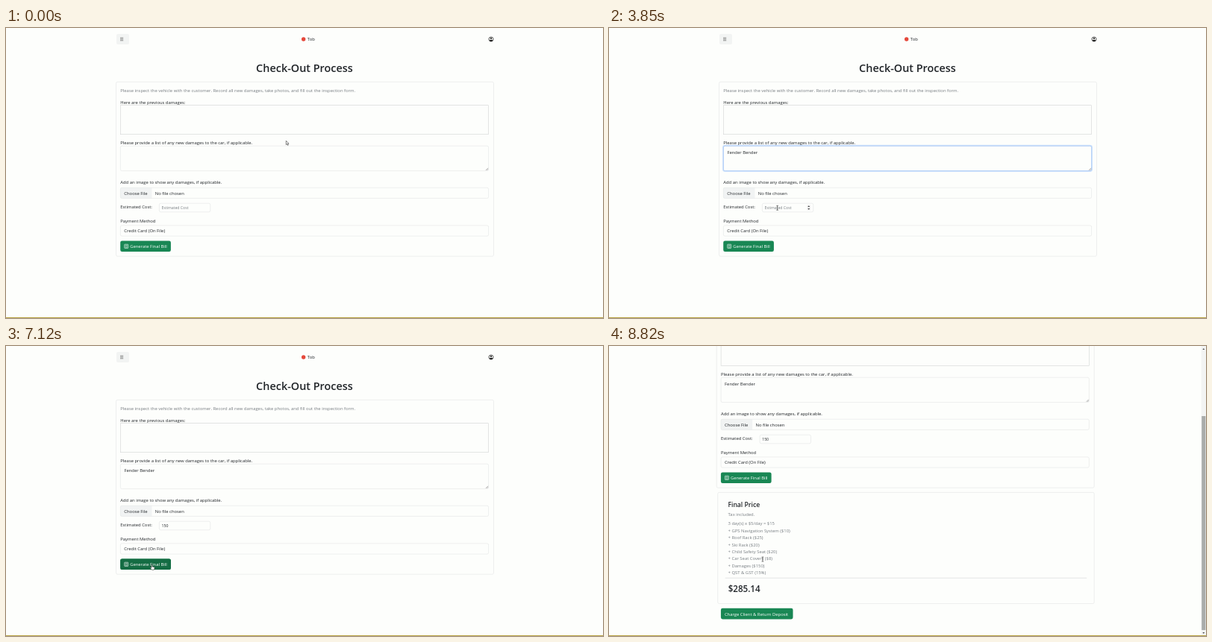
An HTML page that plays this animation: 800 by 389 pixels, repeating every 8850 ms.

```html
<!DOCTYPE html>
<html lang="en">
<head>
<meta charset="utf-8">
<title>Check-Out Process</title>
<style>
  html, body { margin: 0; height: 100%; overflow: hidden; background: #fdfefc; }
  svg { display: block; width: 100%; height: 100%; }
  text { font: 5.89px "Open Sans", "Noto Sans", sans-serif; fill: #212529; white-space: pre; }
  .title { font-size: 14.45px; font-weight: 600; text-anchor: middle; }
  .heading { font-size: 8.65px; font-weight: 600; }
  .total { font-size: 11.6px; font-weight: 600; }
  .muted text, text.muted { fill: #777d82; }
  .small { font-size: 5.17px; }
  .label { fill: #fff; }
  .box { fill: none; stroke: #e3e5e4; stroke-width: .6; }
  .strong { stroke: #d2d5d5; }
  .ring { fill: none; stroke: #0d6efd; stroke-opacity: .27; stroke-width: 1.7; }
  .edge { fill: none; stroke: #86b7fe; stroke-width: .7; }
  .green { fill: #198754; }
  .dark { fill: #146c43; }
  .icon { fill: none; stroke: #fff; stroke-width: .6; }
  .caret { fill: #212529; }
  .pointer { fill: #fff; stroke: #222; stroke-width: .55; stroke-linejoin: round; }
  .beam { fill: none; stroke: #333; stroke-width: .65; }
</style>
</head>
<body>
<svg viewBox="0 0 800 389">
  <rect width="800" height="389" fill="#fdfefc"/>
  <g id="page">
    <rect x="148" y="8" width="17" height="14" rx="2" fill="#f2f4f3"/>
    <path d="M153 13.2h4.2M153 15h4.2M153 16.8h4.2" stroke="#444" stroke-width=".6"/>
    <circle cx="398.7" cy="15" r="2.7" fill="#e5483b"/>
    <text x="403.8" y="17.4">Tob</text>
    <g fill="none" stroke="#111" stroke-width=".7">
      <circle cx="650" cy="15" r="3"/>
      <circle cx="650" cy="14" r="1.1" fill="#111" stroke="none"/>
      <path d="M647.8 17q2.2-2.4 4.4 0q-2.2 2-4.4 0" fill="#111" stroke="none"/>
    </g>
    <text class="title" x="400" y="59.4">Check-Out Process</text>

    <rect class="box" x="147.5" y="72.3" width="506" height="233.9" rx="2"/>
    <text class="muted" x="153.3" y="86">Please inspect the vehicle with the customer. Record all new damages, take photos, and fill out the inspection form.</text>
    <text x="153.3" y="101.5">Here are the previous damages:</text>
    <rect class="box strong" x="153.4" y="103.7" width="493.2" height="39"/>
    <text x="153.3" y="156.2">Please provide a list of any new damages to the car, if applicable.</text>
    <rect class="box" x="153.4" y="158.2" width="493.2" height="33.4" rx="2"/>
    <g id="damageFocus">
      <rect class="ring" x="152.8" y="157.6" width="494.4" height="34.6" rx="2.6"/>
      <rect class="edge" x="153.4" y="158.2" width="493.2" height="33.4" rx="2"/>
    </g>
    <path d="M643 190.8l3-3M644.6 190.8l1.4-1.4" stroke="#777" stroke-width=".6"/>
    <text id="damage" x="158.4" y="168.5"></text>
    <rect class="caret" id="damageCaret" y="162.4" width=".6" height="7.2"/>

    <text x="153.3" y="208.5">Add an image to show any damages, if applicable.</text>
    <rect x="153.4" y="214.2" width="42" height="14.2" fill="#f1f3f3"/>
    <rect class="box" x="153.4" y="214.2" width="493.2" height="14.2" rx="2"/>
    <text x="158.3" y="223.9">Choose File</text>
    <text x="199.8" y="223.9">No file chosen</text>

    <text x="153.3" y="242">Estimated Cost:</text>
    <rect class="box" x="205.4" y="235.2" width="68.4" height="11.6" rx="2"/>
    <g id="costFocus">
      <rect class="ring" x="204.8" y="234.6" width="69.6" height="12.8" rx="2.6"/>
      <rect class="edge" x="205.4" y="235.2" width="68.4" height="11.6" rx="2"/>
    </g>
    <text class="small muted" id="placeholder" x="208.5" y="243">Estimated Cost</text>
    <text class="small" id="cost" x="208.5" y="243"></text>
    <rect class="caret" id="costCaret" y="237.7" width=".6" height="6.4"/>
    <g id="spinner">
      <rect x="265.5" y="237.3" width="4.4" height="7.4" fill="#efefef"/>
      <path d="M266.2 240.1h3l-1.5-1.8zM266.2 241.9h3l-1.5 1.8z" fill="#444"/>
    </g>

    <text x="153.3" y="260.7">Payment Method</text>
    <rect class="box" x="153.4" y="264.9" width="493.2" height="14.2" rx="2"/>
    <text x="158.3" y="274.3">Credit Card (On File)</text>

    <rect class="green" x="153.2" y="285.4" width="67.7" height="14.6" rx="2.3"/>
    <rect class="dark" id="hover" x="153.2" y="285.4" width="67.7" height="14.6" rx="2.3"/>
    <g class="icon">
      <rect x="158.7" y="290.2" width="5" height="5.2" rx=".5"/>
      <path d="M159.7 291.7h3M159.7 293h1.2M161.5 293h1.2M159.7 294.2h3"/>
    </g>
    <text class="label" x="166.2" y="295.3">Generate Final Bill</text>

    <g id="bill">
      <rect class="box" x="149" y="312.4" width="504.5" height="149.2" rx="2"/>
      <text class="heading" x="162.7" y="331.6">Final Price</text>
      <g class="muted" id="lines">
        <text x="162.9" y="344">Tax included.</text>
      </g>
      <path class="box strong" d="M159 427.2h484.5"/>
      <text class="total" x="163" y="446.4">$285.14</text>
      <rect class="green" x="153.2" y="467.8" width="96.6" height="14.6" rx="2.3"/>
      <text class="label" x="158.2" y="477.7">Charge Client &amp; Return Deposit</text>
    </g>
  </g>

  <g id="scrollbar">
    <rect x="793.6" width="6.4" height="389" fill="#f3f4f3"/>
    <path d="M795.3 5h3l-1.5-2zM795.3 384h3l-1.5 2z" fill="#555"/>
    <rect id="thumb" x="794.2" width="5.2" height="287" fill="#aaacab"/>
  </g>
  <rect y="388" width="800" height="1" fill="#b9a544"/>

  <g id="cursor">
    <path class="pointer" id="arrow" d="M0 0v5.2l1.2-1.1.9 2 .9-.4-.9-1.9h1.7z"/>
    <path class="beam" id="beam" d="M-1.3-3H-.4Q0-3 0-2.6Q0-3 .4-3H1.3M0-2.7V2.7M-1.3 3H-.4Q0 3 0 2.6Q0 3 .4 3H1.3"/>
    <path class="pointer" id="hand" d="M-.6.6Q0-.3.6.6V3l2.4.5q.7.2.6 1l-.5 2.7H-.3L-2.2 4.5q0-.9.9-.6l.7.6z"/>
  </g>
</svg>
<script>
const LOOP = 8850, BLINK = 450, FADE = 150;
const $ = id => document.getElementById(id);

const billLines = [
  '3 day(s) x $5/day = $15', '+ GPS Navigation System ($10)', '+ Roof Rack ($25)',
  '+ Ski Rack ($20)', '+ Child Safety Seat ($20)', '+ Car Seat Covers ($8)',
  '+ Damages ($150)', '+ QST & GST (15%)'
];
billLines.forEach((line, i) => {
  const text = document.createElementNS('http://www.w3.org/2000/svg', 'text');
  text.setAttribute('x', 162.9);
  text.setAttribute('y', 356.4 + i * 9.41);
  text.textContent = line;
  $('lines').append(text);
});

const fields = [
  { id: 'damage', value: 'Fender Bender', focus: 400, caret: 520, blur: 3800,
    keys: [1090, 1700, 1790, 1880, 2000, 2110, 2360, 2520, 2610, 2730, 2840, 3030, 3130] },
  { id: 'cost', value: '150', focus: 3900, caret: 3900, blur: 6700, keys: [4610, 5700, 6060] }
];
const path = [
  [0, 375.3, 151.3], [30, 375.3, 151.3], [380, 363.3, 174],
  [3250, 363.3, 174], [3780, 225.6, 241.3],
  [6150, 225.6, 241.3], [6600, 195.5, 293],
  [7150, 195.5, 293], [7420, 205.9, 286]
];
const scroll = [
  [7490, 0], [7550, 21], [7610, 66], [7670, 103.5], [7730, 112.5], [7790, 115.3], [7850, 116]
];

const clamp = v => Math.min(1, Math.max(0, v));
const smooth = v => v * v * (3 - 2 * v);
const ramp = (t, start) => clamp((t - start) / FADE);
const pulse = (t, on, off) => ramp(t, on) - ramp(t, off);
const show = (id, on) => $(id).setAttribute('visibility', on ? 'inherit' : 'hidden');
const move = (id, x, y) => $(id).setAttribute('transform', `translate(${x} ${y})`);

function sample(track, t, ease = v => v) {
  const next = track.findIndex(point => point[0] > t);
  if (next < 0) return track.at(-1).slice(1);
  if (next === 0) return track[0].slice(1);
  const a = track[next - 1], b = track[next];
  const k = ease((t - a[0]) / (b[0] - a[0]));
  return a.slice(1).map((v, i) => v + (b[i + 1] - v) * k);
}

function drawField({ id, value, focus, caret, blur, keys }, t) {
  const typed = keys.filter(key => key <= t).length;
  const text = $(id);
  text.textContent = value.slice(0, typed);
  const since = t - (typed ? keys[typed - 1] : caret);
  const left = +text.getAttribute('x') + text.getComputedTextLength();
  $(id + 'Caret').setAttribute('x', left);
  show(id + 'Caret', t >= focus && t < blur && Math.floor(Math.max(0, since) / BLINK) % 2 === 0);
  $(id + 'Focus').setAttribute('opacity', pulse(t, focus, blur));
  return typed;
}

function cursorKind(t, x, y) {
  if (t >= 7880) return 'beam';
  if (t > 6150 && y > 285) return 'hand';
  const inDamage = y > 158 && y < 191.5;
  const inCost = x > 205 && x < 265 && y > 235 && y < 247;
  return inDamage || inCost ? 'beam' : 'arrow';
}

function draw(t) {
  drawField(fields[0], t);
  show('placeholder', !drawField(fields[1], t));
  show('spinner', t >= 3740 && t < 6700);
  $('hover').setAttribute('opacity', pulse(t, 6520, 7870));

  const billed = t >= 7240;
  const [offset] = sample(scroll, t);
  show('bill', billed);
  show('scrollbar', billed);
  move('page', billed ? -3.3 : 0, -offset);
  $('thumb').setAttribute('y', 7 + offset * .75);

  const [x, y] = sample(path, t, smooth);
  const kind = cursorKind(t, x, y);
  move('cursor', x, y);
  for (const shape of ['arrow', 'beam', 'hand']) show(shape, shape === kind);
}

let start;
function tick(now) {
  start ??= now;
  draw((now - start) % LOOP);
  requestAnimationFrame(tick);
}
draw(0);
requestAnimationFrame(tick);
</script>
</body>
</html>
```
